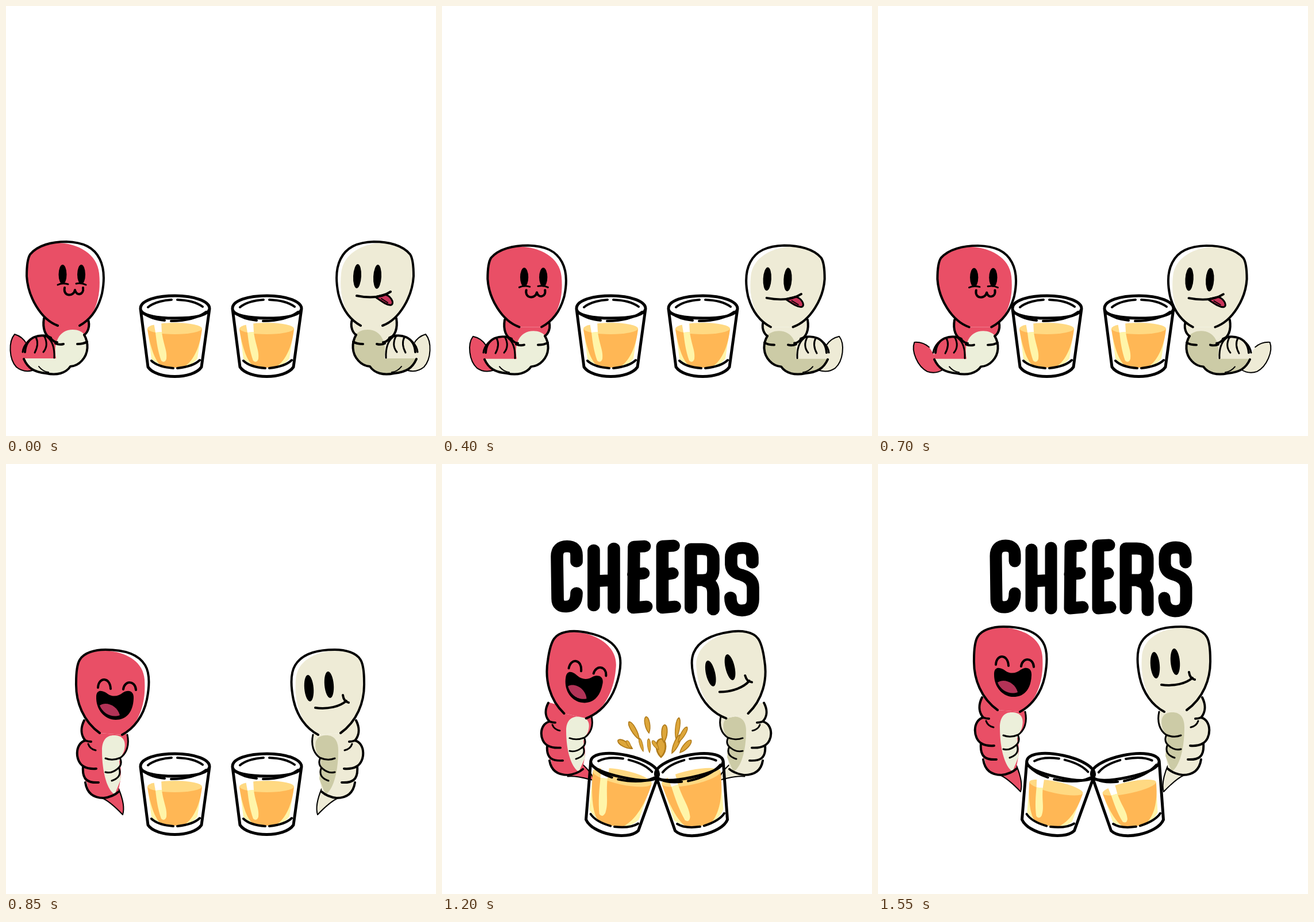
Write an HTML page that moves like this. It is 748 by 748 pixels and loops after 1.7 s.

```html
<!DOCTYPE html>
<html lang="en">
<head>
<meta charset="utf-8">
<title>Cheers</title>
<style>
html, body { margin: 0; width: 100%; height: 100%; overflow: hidden; background: #fff; }
svg { display: block; width: 100%; height: 100%; }
.line { fill: none; stroke: #000; stroke-width: 4; stroke-linecap: round; stroke-linejoin: round; }
.thin { stroke-width: 2; }
.mid { stroke-width: 3; }
.glass { stroke-width: 5; }
.letters { fill: none; stroke: #000; stroke-width: 21; stroke-linejoin: round; stroke-linecap: round; }
.drop { fill: #dda63a; stroke: #b17c1c; stroke-width: 2; }
</style>
</head>
<body>
<svg id="stage" viewBox="0 0 748 748"></svg>
<script>
const LOOP = 1700, STEP = 50;
const stage = document.getElementById('stage');

const fill = (color, d) => `<path fill="${color}" d="${d}"/>`;
const line = (d, extra = '') => `<path class="line ${extra}" d="${d}"/>`;
const oval = (x, y, rx, ry, color = '#000', turn = 0) =>
  `<ellipse cx="${x}" cy="${y}" rx="${rx}" ry="${ry}" fill="${color}" transform="rotate(${turn} ${x} ${y})"/>`;
const group = (name, content) => `<g class="${name}">${content}</g>`;

const crawlFaces = {
  cat: oval(98.5, 467, 7, 17) + oval(131, 467, 7, 17) +
    line('M90 485Q98 481 108 484M122 483Q131 481 139 485', 'mid') +
    line('M102 490C99 506 118 506 120 494C122 505 136 503 134 490'),
  tongue: oval(134, 470, 7, 21, '#000', -3) + oval(99, 471, 7, 21, '#000', -3) +
    `<path class="line mid" style="fill:#c9345a" d="M103 506C95 511 82 522 75 520C68 517 77 502 87 502Z"/>` +
    line('M92 509L81 516', 'thin') + line('M135 504C115 508 92 508 76 497')
};
const standFaces = {
  laugh: line('M205 349C206 330 226 330 227 351M249 352C251 336 270 336 271 353') +
    fill('#000', 'M202 364C203 351 214 354 222 360C231 366 241 364 248 358C257 352 268 354 267 368C266 393 253 405 236 405C217 405 201 388 202 364Z') +
    fill('#b33357', 'M208 380C219 372 239 380 243 397C230 402 214 395 208 380Z'),
  smile: oval(263, 350, 8, 23, '#000', 5) + oval(228, 344, 8, 23, '#000', 5) +
    line('M252 384C230 387 209 382 198 372M204 362C203 370 199 374 194 375')
};

function crawler(main, belly, face) {
  const headLeft = 'M90 556C60 545 38 505 36 470C36 452 38 438 42 432';
  const head = headLeft + 'C55 416 80 410 105 410C135 411 153 420 163 440C172 458 171 480 167 500C161 525 148 545 128 556';
  const tail = 'M36 588Q29 575 15 571C4 584 5 614 18 628Q30 638 46 634';
  return group('tail', fill(main, tail + 'Z') + line(tail, 'thin')) +
    fill(main, 'M66 540C62 560 68 572 76 578C58 569 38 575 32 590L30 614L112 628L141 590L137 574Q147 562 141 540Z') +
    fill(belly, 'M30 613H87C82 586 92 563 116 563C134 563 144 576 142 592C141 610 130 623 112 628C104 640 88 642 70 639C48 637 38 630 30 613Z') +
    line('M66 543C63 562 69 574 77 577Q83 585 89 585M142 543C148 558 141 569 136 572') +
    line('M136 572C144 586 144 604 132 617Q124 626 112 627C104 639 88 643 70 639C49 637 38 630 31 614') +
    line('M124 588Q135 588 141 584M86 587Q93 590 100 588M33 602Q34 583 49 576Q64 570 78 577') +
    line('M38 584Q30 592 29 602M52 576Q58 588 50 603M66 573Q75 590 65 602M72 576Q85 586 84 612', 'mid') +
    line('M57 627Q64 636 74 637', 'thin') +
    group('head', fill('#fff', head + 'Z') +
      fill(main, headLeft + 'C52 419 70 413 88 412C126 412 159 432 162 465C165 495 160 525 143 545L128 556Z') +
      line(head) + face);
}

function stander(main, belly, face) {
  const headLeft = 'M208 428C180 408 166 375 167 340C167 320 169 308 173 301';
  const head = headLeft + 'C180 288 200 283 218 283C250 283 275 290 287 310C296 325 294 350 290 370C284 398 268 420 247 431';
  const tail = 'M212 541Q226 547 248 570Q253 554 241 525';
  return group('tail', fill(main, tail + 'L215 515Z') + line(tail, 'thin')) +
    group('torso',
      fill(main, 'M181 405C173 422 177 434 183 441C164 446 165 478 180 486C177 502 181 511 186 514C186 532 199 541 215 541L240 531L245 505L244 472C258 462 260 443 253 426Z') +
      fill(belly, 'M212 458C212 439 221 431 235 432C249 433 255 442 250 460L242 477L245 508L234 535C220 526 212 494 212 458Z') +
      line('M181 406C173 422 177 434 183 441Q188 443 193 443M183 441C164 446 165 478 180 486Q188 491 202 490M179 486C177 510 188 515 206 514M183 514C186 534 199 541 215 541Q231 539 241 530') +
      line('M256 431C260 449 255 463 244 471Q230 477 218 472M244 473Q248 484 238 491Q228 499 218 496M242 490Q247 505 229 511', 'mid') +
      line('M188 447Q191 456 201 458', 'mid')) +
    group('head', fill('#fff', head + 'Z') +
      fill(main, headLeft + 'C184 286 207 284 225 285C257 289 284 305 286 335C288 365 283 395 262 421L247 431Z') +
      line(head) + face);
}

const worm = (main, belly, crawlFace, standFace) =>
  group('crawl', crawler(main, belly, crawlFace)) + group('stand', stander(main, belly, standFace));

const glass = group('liquid',
    fill('#fff5a9', 'M246 560L253 614Q270 629 293 629Q322 629 333 613L341 560Z') +
    fill('#ffb755', 'M246 562C250 590 260 625 275 628Q293 631 311 627C328 615 338 590 341 562Z') +
    oval(293.5, 561, 47.5, 10, '#ffd982') +
    fill('#fff', 'M257 551L270 550L271 567L260 568Z') +
    fill('#fff5a9', 'M260 568L271 567C274 590 281 600 279 614Q276 622 270 617C264 600 262 585 260 568Z')) +
  line('M234 527C233 512 262 504 294 504C328 504 355 514 354 527C351 540 323 543 294 543C264 543 235 539 234 527L247 628C262 650 325 650 340 628L354 527', 'glass') +
  line('M247 524Q260 513 288 511M298 511Q327 512 342 523M240 535Q253 545 276 547M287 548Q327 548 348 532M253 617Q264 628 291 630M298 630Q326 627 337 616');

// x, y, turn, width and length of each splash drop
const drops = [
  [361, 502, -4, .5, .75], [350, 500, -16, .5, .75], [331, 495, -60, .9, .9], [329, 495, -30, .5, .5],
  [343, 479, -30, .8, 1.1], [360, 468, -10, .8, .9], [381, 510, 0, 1.5, 1], [386, 484, 3, .9, .95],
  [377, 497, -35, .6, .6], [400, 503, 25, .8, 1.1], [407, 478, 8, .7, 1.15], [411, 484, 30, .7, .95],
  [414, 502, 42, .8, .9]
];
const splash = drops.map(([x, y, turn, w, h]) =>
  `<path class="drop" transform="translate(${x} ${y}) rotate(${turn}) scale(${w} ${h})" d="M0 0C-7-10-7-30 0-32C7-30 7-10 0 0Z"/>`).join('');

const letters = [
  'M238 169V158Q238 142 222 142Q205 142 205 160L206 235Q206 250 221 249Q238 248 238 225',
  'M267 149V247M301 146V251M267 204L301 202',
  'M353 142L335 143L334 251L356 249M334 192L351 190',
  'M402 141L383 142L383 251L404 249M383 193L400 190',
  'M431 147V251M431 147H450Q469 147 469 164V183Q469 202 451 202H435M455 204Q469 207 469 225V254',
  'M535 171V162Q535 145 518 145Q499 145 499 162V174Q500 189 517 193Q536 199 536 215V236Q536 256 517 256Q498 255 498 233'
].map(d => `<path d="${d}"/>`).join('');

stage.innerHTML =
  group('worm', worm('#e94f66', '#ecefda', crawlFaces.cat, standFaces.laugh)) +
  `<g class="worm" transform="matrix(-1 0 0 1 745 0)">${worm('#eeebd6', '#cccba6', crawlFaces.tongue, standFaces.smile)}</g>` +
  group('splash', splash) +
  group('cup', glass) + `<g transform="translate(160 0)">${group('cup', glass)}</g>` +
  `<g class="letters" role="img" aria-label="CHEERS">${letters}</g>`;

const all = selector => [...stage.querySelectorAll(selector)];
const parts = {
  crawl: all('.crawl'), crawlTail: all('.crawl .tail'), crawlHead: all('.crawl .head'),
  stand: all('.stand'), standTail: all('.stand .tail'), standHead: all('.stand .head'), torso: all('.torso'),
  cup: all('.cup'), liquid: all('.liquid'), splash: all('.splash'), letters: all('.letters')
};
const pose = (name, value) => parts[name].forEach((el, i) =>
  el.setAttribute('transform', typeof value === 'function' ? value(i) : value));
const show = (name, on) => parts[name].forEach(el => el.setAttribute('display', on ? 'inline' : 'none'));
const scaleAt = (x, y, sx, sy) => `translate(${x} ${y}) scale(${sx} ${sy}) translate(${-x} ${-y})`;

// Linear interpolation over rows of [time, ...values]
function track(t, rows) {
  const i = rows.findIndex(row => row[0] > t);
  if (i === 0) return rows[0].slice(1);
  if (i < 0) return rows[rows.length - 1].slice(1);
  const a = rows[i - 1], b = rows[i], k = (t - a[0]) / (b[0] - a[0]);
  return a.slice(1).map((v, j) => v + (b[j + 1] - v) * k);
}

function draw(t) {
  const standing = t >= 850;
  show('crawl', !standing);
  show('stand', standing);

  // shift, squash, tail turn
  const [dx, squash, wag] = track(t, [
    [0, 0, 1, 0], [150, 20, .925, 5], [300, 34, .99, -6], [400, 43, .972, -4],
    [500, 51, .93, 4], [550, 55, .935, 0], [700, 67, .97, -20], [800, 80, .92, -10]]);
  pose('crawl', `translate(${dx} 0) ${scaleAt(0, 641, 1, squash)}`);
  pose('crawlTail', `rotate(${wag} 40 630)`);
  pose('crawlHead', `translate(${(1 - squash) * 40} 0) ${scaleAt(75, 556, 1 + (1 - squash) * .68, 1)}`);

  // offset, then head turn and shift, torso height, tail turn
  const [x, y] = track(t, [[850, -45, 40], [950, 0, 0]]);
  const [turn, hx, hy, height, tail] = track(t, [
    [950, 0, 0, 0, 1, 0], [1000, 2.5, 2, 0, 1, -11], [1150, 8, 4, 9, .93, -30],
    [1200, 8, 4, 9, .93, -30], [1400, 2, 1, 2, .98, -8], [1550, 0, 0, 0, 1, 0]]);
  pose('stand', `translate(${x} ${y})`);
  pose('standHead', `translate(${hx} ${hy}) rotate(${turn} 230 430)`);
  pose('torso', `translate(${hx} 0) ${scaleAt(210, 541, 1, height)}`);
  pose('standTail', `rotate(${tail} 220 530)`);

  const [tilt] = track(t, [[950, 0], [1000, 3], [1100, 12]]);
  const [wide, high] = track(t, [[1050, 1, 1], [1150, 1.1, 1.26], [1200, 1.1, 1.26], [1350, 1, 1]]);
  pose('cup', i => `rotate(${i ? -tilt : tilt} 294 640)`);
  pose('liquid', scaleAt(294, 630, wide, high));

  const [burst] = track(t, [[1050, 0], [1150, .9], [1200, 1], [1300, 1.08], [1400, 0]]);
  show('splash', burst > 0);
  pose('splash', scaleAt(372, 525, burst, burst));

  const [cy, sx, sy] = track(t, [
    [900, 440, 0, 0], [1000, 327, .515, .53], [1100, 198, 1.08, 1.09], [1200, 198, 1.03, .98],
    [1300, 198, .99, 1.01], [1400, 198, 1, 1]]);
  show('letters', sx > 0);
  pose('letters', `translate(370 ${cy}) scale(${sx} ${sy}) translate(-370 -198)`);
}

const start = performance.now();
function frame() {
  const t = (performance.now() - start) % LOOP;
  draw(Math.min(1550, Math.floor(t / STEP) * STEP));
  requestAnimationFrame(frame);
}
frame();
</script>
</body>
</html>
```
